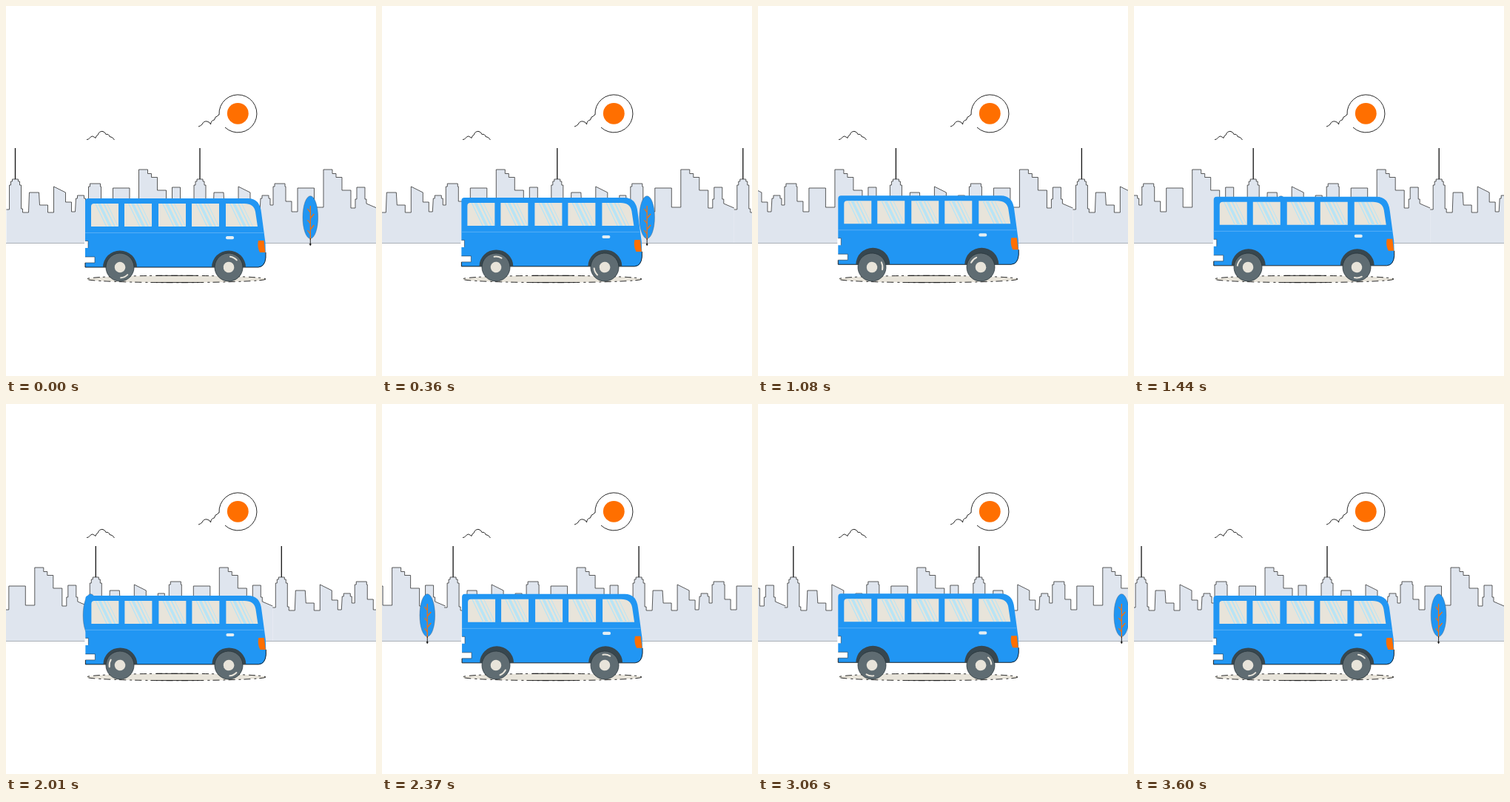
Write an HTML page that moves like this. It is 500x500 px and loops after 3630 ms.

```html
<!DOCTYPE html>
<html lang="en">
<head>
<meta charset="utf-8">
<title>Bus ride</title>
<style>
  html, body { margin: 0; width: 100%; height: 100%; overflow: hidden; background: #fff; }
  svg { display: block; width: 100vw; height: 100vh; }
  .line { fill: none; stroke: #111; stroke-width: .9; }
</style>
</head>
<body>
<svg viewBox="0 0 500 500">
  <defs>
    <g id="city">
      <path id="cityFill" fill="#dfe5ee"/>
      <path id="cityLine" class="line" style="stroke:#333;stroke-width:.8"/>
      <path class="line" style="stroke-width:1.3" d="M0 192V234"/>
    </g>
    <g id="tree">
      <ellipse cy="285.5" rx="10.3" ry="28.8" fill="#2196f3" stroke="#456" stroke-width=".4"/>
      <path d="M0 270V316M0 279l-4 -5M0 287l5 -6M0 294l-4 -5M0 302l5 -6M0 308l-4 -5"
            fill="none" stroke="#ff6f00" stroke-width="1.2"/>
      <path class="line" d="M0 314V324"/>
      <circle cy="322" r="1.3" fill="#222"/>
    </g>
    <g id="wheel">
      <circle r="19" fill="#5f6c72" stroke="#263238" stroke-width=".7"/>
      <path class="shine" d="M13.5 -5A14.5 14.5 0 0 1 13.5 5" fill="none" stroke="#e8e4da" stroke-width="2" stroke-linecap="round"/>
      <circle r="7.3" fill="#e8e4da"/>
    </g>
    <clipPath id="panes"><path id="paneClip"/></clipPath>
  </defs>

  <g id="skyline">
    <use href="#city" x="-249.5"/>
    <use href="#city"/>
    <use href="#city" x="251"/>
  </g>
  <path d="M0 320.5H500" stroke="#aab0b8"/>
  <g id="trees">
    <use href="#tree"/>
    <use href="#tree" x="532"/>
  </g>

  <circle cx="313.3" cy="145.3" r="14.4" fill="#ff6f00"/>
  <path class="line" d="M260 163q3 -1 5 -3q2 -5 7 -4q4 1 4.500 4q1 -6 5 -6q1 -5 4 -5q1 -2 2.500 -2A25.500 25.500 0 1 1 296 164"/>
  <path class="line" d="M109 180.500q3 0 4 -2q3 -4 6 -1.500l2 1.500q1 -4 3 -4q2 -6 7 -5q3 1 4 4q4 -1 5 3q4 0 6.500 4.500"/>

  <ellipse cx="230" cy="369" rx="121" ry="4.700" fill="#e8e4da"/>
  <ellipse class="line" cx="230" cy="369" rx="121" ry="4.700" stroke-dasharray="9 4 3 5"/>
  <path class="line" d="M203 364.300H260M203 373.600H260"/>

  <g id="bus">
    <path d="M107 353V264q0 -4 4 -4H327Q343 260 345 279L350.500 320L351 340Q350 353 341 353Z" fill="#2196f3"/>
    <path class="line" d="M107 347V353H341Q350 352 351 340V333"/>
    <path d="M106 317.500H111V327H106ZM106 339H120V347H106Z" fill="#fff"/>
    <path class="line" d="M107 339H120V347H107M107 317.500H111V327" style="stroke:#234;stroke-width:.6"/>
    <path d="M107 306.500H348" stroke="#64b5f6" stroke-width=".8"/>
    <path id="glass" fill="#e8e4da"/>
    <path id="glare" clip-path="url(#panes)" fill="#b8e4f5"/>
    <rect x="297" y="311" width="11" height="4.200" rx="2" fill="#e3eef3"/>
    <path d="M341 317H348.500L350.500 333H343Q339 325 341 317Z" fill="#ff6f00"/>
    <path d="M131 353a23 22.500 0 0 1 46 0ZM278 353a23 22.500 0 0 1 46 0Z" fill="#37474f"/>
  </g>
  <g class="roller" data-x="154" data-start="65"><use href="#wheel"/></g>
  <g class="roller" data-x="301" data-start="298"><use href="#wheel"/></g>
</svg>
<script>
  const LOOP = 3630, STEP = 30;
  const $ = id => document.getElementById(id);

  // Roof outline, x measured from the mast
  const roofs = 'M-12 275H-8V242H-6V237H-4V234H4V237H6V242H8V274H10V279H18L19 252H32L33 269H44V279' +
    'H52V244L68 252V265H76V278H81L82 260H84V256H93V260H95V269H99V244H101V240H115V244H116V264H124V278' +
    'H132V246H154.500V272H167V221H179V226.500H184V231.500H192V249H204V273H210V261H212V245H223V261H225V267L239 273';
  $('cityLine').setAttribute('d', roofs);
  $('cityFill').setAttribute('d', roofs + 'V320H-12Z');

  const lefts = [115, 160, 206, 251, 297];
  const panes = 'M119 267H152V298H115V271Q115 267 119 267Z' +
    lefts.slice(1, 4).map(x => `M${x} 267h37v31h-37Z`).join('') +
    'M297 267H322Q335 267 337 278L340 298H297Z';
  $('glass').setAttribute('d', panes);
  $('paneClip').setAttribute('d', panes);

  const stripe = (x, w) => `M${x} 267h${w}l15 31h${-w}Z`;
  $('glare').setAttribute('d', lefts.map(x =>
    stripe(x + 5, 1.5) + stripe(x + 9, 4) + stripe(x + 16, 2) + stripe(x + 21, 1)).join(''));

  const move = (el, x, y = 0, turn = 0) =>
    el.setAttribute('transform', `translate(${x} ${y}) rotate(${turn})`);

  function draw(now) {
    const t = Math.floor(now % LOOP / STEP) * STEP;
    const lift = (1 - Math.cos(2 * Math.PI * t / 165)) / 2;
    move($('skyline'), 262 - .07 * t);
    move($('trees'), 411.3 - .1477 * t);
    move($('bus'), 1.3 * lift, -3.8 * lift);
    for (const wheel of document.querySelectorAll('.roller'))
      move(wheel, wheel.dataset.x, 353, +wheel.dataset.start + .6 * t);
  }

  const start = performance.now();
  function tick() {
    draw(performance.now() - start);
    requestAnimationFrame(tick);
  }
  tick();
</script>
</body>
</html>
```
